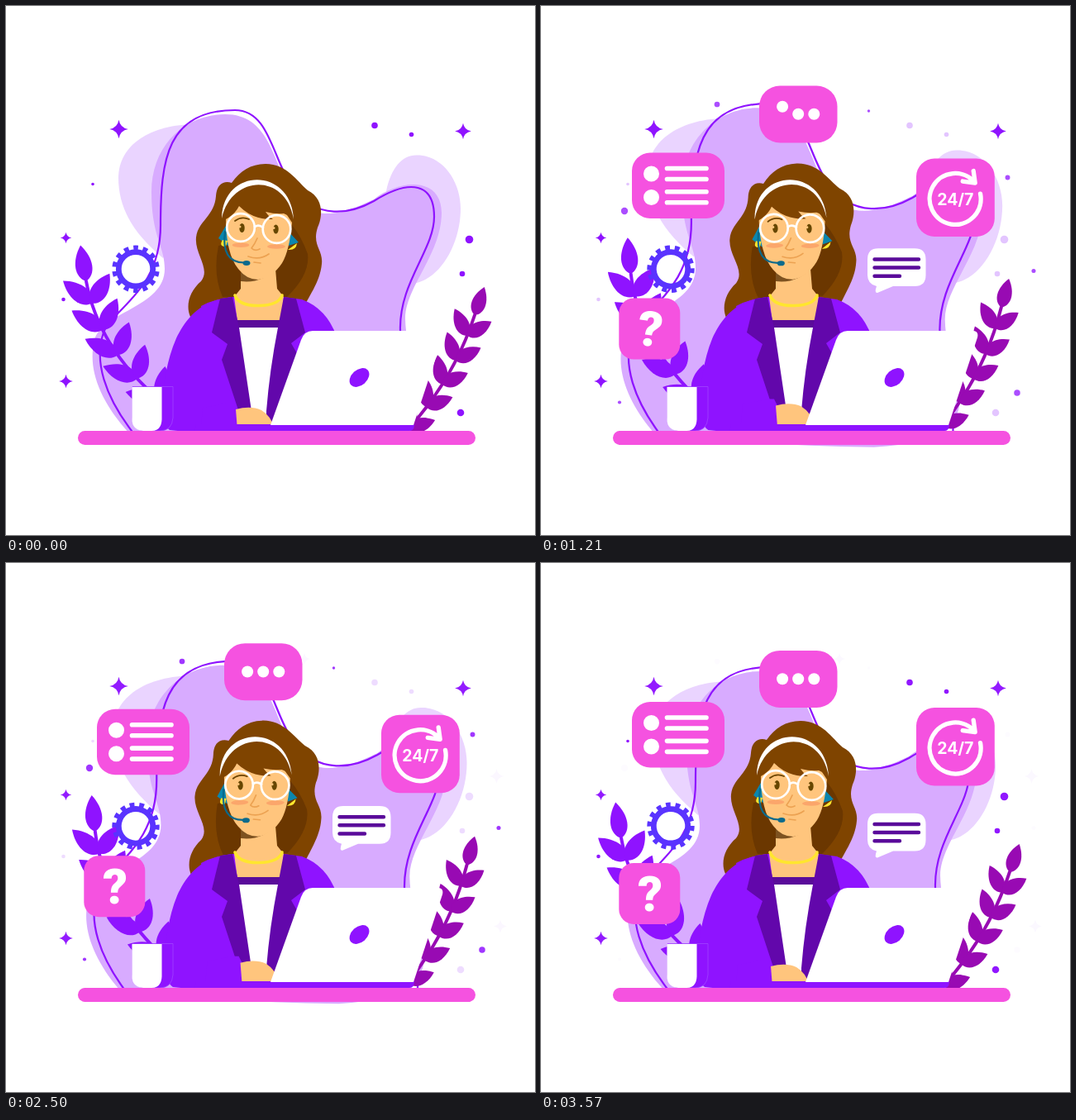
An HTML page for the animation above (3640 ms loop, 640x640 px).

```html
<!DOCTYPE html>
<html>
<head>
<meta charset="utf-8">
<style>
  html, body { margin: 0; width: 100%; height: 100%; overflow: hidden; background: #fff; }
  svg { display: block; width: 100vw; height: 100vh; }
  text { fill: #fff; text-anchor: middle; }
  .line { fill: none; stroke-linecap: round; stroke-linejoin: round; }
  .pink { fill: #f552e0; }
  .white { fill: #fff; }
  .skin { fill: #ffc57d; }
  .purple { fill: #8f13ff; }
</style>
</head>
<body>
<svg viewBox="0 0 640 640">
  <g id="blob">
    <path d="M230 143C175 143 136 168 136 208C136 250 160 280 190 305L230 250Z" fill="#ead4ff"/>
    <path d="M460 224C466 195 480 180 497 180.5C528 180 550 212 550 245C550 290 523 334 490 336V280Z" fill="#ead4ff"/>
    <path d="M150 518C115 480 98 440 107 405C114 370 192 365 192 318C192 290 176 280 176 225C176 170 215 131 265 131C318 131 322 185 345 225C372 272 425 243 445 234C475 210 526 205 527 250C527 300 483 340 483 378C484 420 500 440 500 475Q498 522 400 527Q300 526 220 518Z" fill="#d8abff"/>
    <path class="line" d="M152 514C120 472 106 430 118 395C130 365 187 345 187 265S195 126 277 126C318 126 322 182 345 217C375 262 420 250 445 236C490 208 518 215 518 255S475 335 477 393C478 440 496 460 492 515" stroke="#8f13ff" stroke-width="2.2"/>
  </g>
  <g id="sky" class="purple"></g>
  <g id="sprigL" fill="#8f13ff" stroke="#8f13ff"></g>
  <g id="sprigR" fill="#980ab3" stroke="#980ab3"></g>
  <g id="gear" fill="none" stroke="#5a33ff">
    <circle r="20.7" stroke-width="6.8"/>
    <circle r="25.7" stroke-width="6" pathLength="28" stroke-dasharray="1 1" stroke-dashoffset="-.5"/>
  </g>

  <g class="head">
    <path d="M314 191C340 191 352 212 365 223C385 233 383 255 377 268C370 290 384 295 382 312C380 335 365 352 358 370H250L223 376C217 362 222 345 236 333C248 318 228 300 230 280C232 260 252 255 254 230C255 215 264 211 273 214C283 200 296 191 314 191Z" fill="#7f4400"/>
    <path d="M257 290Q250 325 262 352H340Q368 325 365 300Q358 280 346 265Z" fill="#6b3700"/>
  </g>

  <path class="purple" d="M276 352Q252 354 236 363L262 514H400V400Q388 366 358 355L336 352Z"/>
  <path id="arm" class="purple" d="M276 352C235 355 218 378 206 402C194 430 191 455 189 480Q187 505 198 513Q235 518 270 514H281L280 487L262 430Z"/>
  <path class="white" d="M280 385H331L318 507H296Z"/>
  <path class="skin" d="M284 322V342L276 352L280 382H333L336 352L328 342L326 318Z"/>
  <path d="M284 322V333Q310 336 327 317Z" fill="#7d5220"/>
  <path d="M278 380H332L330 389H280Z" fill="#5a0b9a"/>
  <path d="M274 352L282 389L297 490V507H287L261 428L268 409L249 395L259 354ZM336 352L329 389Q319 440 315 490V507H335L353 422L345 408L362 395L351 354Z" fill="#6207ab"/>
  <path class="line" d="M277 350Q282 363 306 362.5T334 350" stroke="#ffe62e" stroke-width="3.6"/>
  <g id="hand">
    <path class="purple" d="M235 520L238 486L268 480H276L280 488V520Z"/>
    <path class="skin" d="M278 488Q296 483 309 489Q322 497 325 513H280Z"/>
  </g>

  <g class="head">
    <path d="M257 281L267 264L271 292ZM342 273L354 286L342 290Z" fill="#0b86ae"/>
    <path d="M262 283Q257 291 266 291L268 284ZM341 295L352 287Q351 296 341 295Z" fill="#ffe62e"/>
    <path class="skin" d="M266 255Q266 300 281 318Q291 331 305 331Q322 329 334 311Q343 296 346 262L325 230H285Z"/>
    <path d="M262 262Q264 215 304 211Q342 215 348 264Q345 254 336 251Q326 252 314 249Q318 255 323 258Q299 259 282 242Q277 252 266 258Z" fill="#7f4400"/>
    <path class="white" d="M261 257C262 195 345 194 348 258C339 202 273 203 261 257Z"/>
    <g fill="#fba66b">
      <ellipse cx="284" cy="289.3" rx="10.5" ry="2.8"/>
      <ellipse cx="327" cy="291" rx="11" ry="2.8"/>
    </g>
    <path class="line" d="M277 260Q285 254 294 258" stroke="#6b4300" stroke-width="1.8"/>
    <g fill="#674700">
      <ellipse cx="285.5" cy="268.5" rx="3.2" ry="5.5"/>
      <ellipse cx="326.5" cy="270" rx="3.2" ry="5.5"/>
    </g>
    <g class="skin">
      <circle cx="283" cy="267" r="1.5"/>
      <circle cx="324" cy="268.5" r="1.5"/>
    </g>
    <path class="line" d="M304 281Q301 288 297 293Q301 297 307 294M293 303Q307 308 318 300M300 310L308 311" stroke="#eca252" stroke-width="1.7"/>
    <g class="line" stroke="#fff" stroke-width="2.7">
      <circle cx="284" cy="268" r="16.8"/>
      <circle cx="327.5" cy="270" r="16.8"/>
      <path d="M301 267Q306 264 311 268"/>
    </g>
    <path class="line" d="M265 273Q260 310 288 310.5" stroke="#0b6a8c" stroke-width="2.2"/>
    <ellipse cx="291" cy="311" rx="4.5" ry="3" fill="#0b6a8c"/>
  </g>

  <path class="purple" d="M320 506H494Q494 514 488 514H228L230 506Z"/>
  <path class="white" d="M371 393H522Q530 393 528 401L493 507H320L357 404Q361 393 371 393Z"/>
  <ellipse class="purple" rx="13.6" ry="9.4" transform="translate(427.5 449.5) rotate(-42)"/>
  <path class="purple" d="M153 460.5H202V498Q201 514 186 514H166Q153 512 153 498Z" stroke="#a44dff" stroke-width=".7"/>
  <path class="white" d="M152.5 461H188.5V500Q188 514 176 514H166Q152.5 513 152.5 500Z"/>
  <rect class="pink" x="87" y="514" width="481" height="17" rx="8.5"/>

  <!-- Bubbles in order of appearance; data-anchor is the fixed corner while growing -->
  <g class="bubble" data-anchor="0 1">
    <path class="white" d="M408 302.7H452Q465.5 302.7 465.5 316V335Q465.5 348.5 452 348.5H426L407 356.5Q403 357 406 348.5Q395 346 395 335V316Q395 302.7 408 302.7Z"/>
    <path class="line" d="M403.5 316H457M403.5 326H457M403.5 336.3H434" stroke="#5a0b9a" stroke-width="4.4"/>
  </g>
  <g class="bubble down" data-anchor="0 1">
    <rect class="pink" x="454" y="175" width="94.8" height="94.5" rx="22"/>
    <g id="arrow" class="line" stroke="#fff" stroke-width="5.3">
      <path d="M30.3 -6.4A31 31 0 1 1 23.7 -20M22 -34L24 -19.5L9 -21.5"/>
    </g>
    <text x="501.3" y="231.2" font-size="19.5" font-weight="700" font-family="Inter, sans-serif">24/7</text>
  </g>
  <g class="bubble down" data-anchor="1 1">
    <rect class="pink" x="110" y="168" width="112" height="79.5" rx="22"/>
    <path class="line" d="M133.5 193.5h0M133.5 222h0" stroke="#fff" stroke-width="19"/>
    <path class="line" d="M152.5 187h47.5m0 13h-47.5m0 15.3h47.5m0 13h-47.5" stroke="#fff" stroke-width="5.6"/>
  </g>
  <g class="bubble" data-anchor=".5 1">
    <rect class="pink" x="264" y="106" width="94.5" height="69" rx="25"/>
    <g id="dots" class="white"></g>
  </g>
  <g class="bubble" data-anchor="1 0">
    <rect class="pink" x="94.3" y="363" width="74" height="74" rx="18"/>
    <text id="mark" x="132" y="421" font-size="59" font-weight="900" font-family="Roboto, sans-serif">?</text>
  </g>
</svg>
<script>
const LOOP = 3640;
const $ = id => document.getElementById(id);
const all = selector => [...document.querySelectorAll(selector)];
const place = (node, value) => node.setAttribute('transform', value);

function add(parent, tag, attrs) {
  const node = document.createElementNS('http://www.w3.org/2000/svg', tag);
  for (const key in attrs) node.setAttribute(key, attrs[key]);
  return parent.appendChild(node);
}

// A curved stem a-b-c with a leaf at its end and pairs of leaves that turn step by step
function sprig(parent, [a, b, c], { top, size, width, left, right }) {
  const leaf = ([x, y], angle, len) => add(parent, 'path', {
    d: `M0 0C${len * .15} ${-width} ${len * .6} ${-width} ${len} 0C${len * .6} ${width} ${len * .15} ${width} 0 0`,
    transform: `translate(${x} ${y}) rotate(${angle})`, stroke: 'none'
  });
  const onStem = u => [0, 1].map(k => (1 - u) ** 2 * a[k] + 2 * u * (1 - u) * b[k] + u * u * c[k]);
  add(parent, 'path', { d: `M${a}Q${b} ${c}`, class: 'line', 'stroke-width': 4 });
  leaf(a, top, size);
  for (let i = 0; i < 5; i++) {
    const joint = onStem(.17 + .215 * i);
    leaf(joint, left.from + left.step * i, size);
    leaf(joint, right.from + right.step * i, size - 2);
  }
}
sprig($('sprigL'), [[97, 333], [112, 413], [183, 474]], {
  top: -99, size: 44, width: 13.5, left: { from: -142, step: -6 }, right: { from: -59, step: -6 }
});
sprig($('sprigR'), [[567, 374], [543, 448], [490, 508]], {
  top: -71, size: 36, width: 11.5, left: { from: -115, step: 8 }, right: { from: -30, step: 3 }
});

const star = (x, y, r) => add($('sky'), 'path', {
  d: 'M0-1Q.15-.15 1 0Q.15 .15 0 1Q-.15 .15-1 0Q-.15-.15 0-1',
  transform: `translate(${x} ${y}) scale(${r})`
});
const dot = (cx, cy, r) => add($('sky'), 'circle', { cx, cy, r });
// Marks listed from large to small
const scatter = (make, size, step, points) => points.map(([x, y], i) => make(x, y, size - step * i));

const starsA = scatter(star, 11.3, 1.5, [[136.5, 149], [553, 151.5], [72.5, 454], [72.5, 280.5]]);
const starsB = scatter(star, 8.8, .9, [[593.5, 258], [598, 439.5], [361, 116]]);
const dotsA = scatter(dot, 4.8, .5,
  [[560.5, 282.5], [550, 492], [446, 144.5], [552, 324], [490.5, 155.5], [69.5, 355], [105, 215.5]]);
const dotsB = scatter(dot, 4.2, .42,
  [[101, 248], [576, 468], [213, 119], [564.5, 207.5], [596, 320.5], [95, 479.5], [396.5, 127]]);
const typing = [-1, 0, 1].map(i => add($('dots'), 'circle', { cx: 311.2 + 19.1 * i, cy: 140.3, r: 7 }));

const heads = all('.head');
const bubbles = all('.bubble').map(node => {
  const box = node.firstElementChild.getBBox();
  const [u, v] = node.dataset.anchor.split(' ');
  return {
    node, x: box.x + u * box.width, y: box.y + v * box.height,
    drift: node.classList.contains('down') ? 12.7 : -12.7
  };
});

const ease = u => (1 - Math.cos(Math.PI * Math.max(0, Math.min(1, u)))) / 2;
const wave = (t, cycles) => (1 + Math.cos(2 * Math.PI * cycles * t / LOOP)) / 2;
const fade = (nodes, value) => nodes.forEach(n => n.setAttribute('opacity', value));
const hop = u => u > 0 && u < 1 ? Math.sin(Math.PI * u) : 0;

function draw(t) {
  const sway = 1 - wave(t, 1);
  place($('blob'), `translate(327 344) scale(${1 + .049 * sway}) translate(-327 -344)`);
  place($('sprigL'), `rotate(${5.2 * sway} 234 501)`);
  place($('sprigR'), `rotate(${-5.2 * sway} 425 520)`);
  heads.forEach(h => place(h, `rotate(${-2.6 * sway} 300 330)`));
  place($('arm'), `translate(0 352) skewX(${2 * sway}) translate(0 -352)`);
  place($('hand'), `translate(${8 * sway} ${-6 * sway})`);
  place($('gear'), `translate(157 318.3) rotate(${360 * t / LOOP})`);

  fade(starsA, wave(t, 3));
  fade(starsB, 1 - wave(t, 3));
  fade(dotsA, wave(t, 2));
  fade(dotsB, 1 - wave(t, 2));

  bubbles.forEach(({ node, x, y, drift }, i) => {
    const size = ease((t - 80 - 50 * i) / 500);
    place(node, `translate(${x} ${y + drift * sway}) scale(${size}) translate(${-x} ${-y})`);
  });
  place($('arrow'), `translate(501.2 224) rotate(${360 * ease((t - 1325) / 1000)})`);
  const tilt = t > 1100 && t < 1900 ? 8 * Math.sin(2 * Math.PI * (t - 1100) / 400) : 0;
  place($('mark'), `rotate(${tilt} 132 400)`);
  typing.forEach((d, i) => {
    const since = (t - 1060 + LOOP) % LOOP % 1600 - 150 * i;
    place(d, `translate(0 ${t > 1060 ? -9 * hop(since / 300) : 0})`);
  });
}

const begin = performance.now();
function tick() {
  draw((performance.now() - begin) % LOOP);
  requestAnimationFrame(tick);
}
draw(0);
requestAnimationFrame(tick);
</script>
</body>
</html>
```
